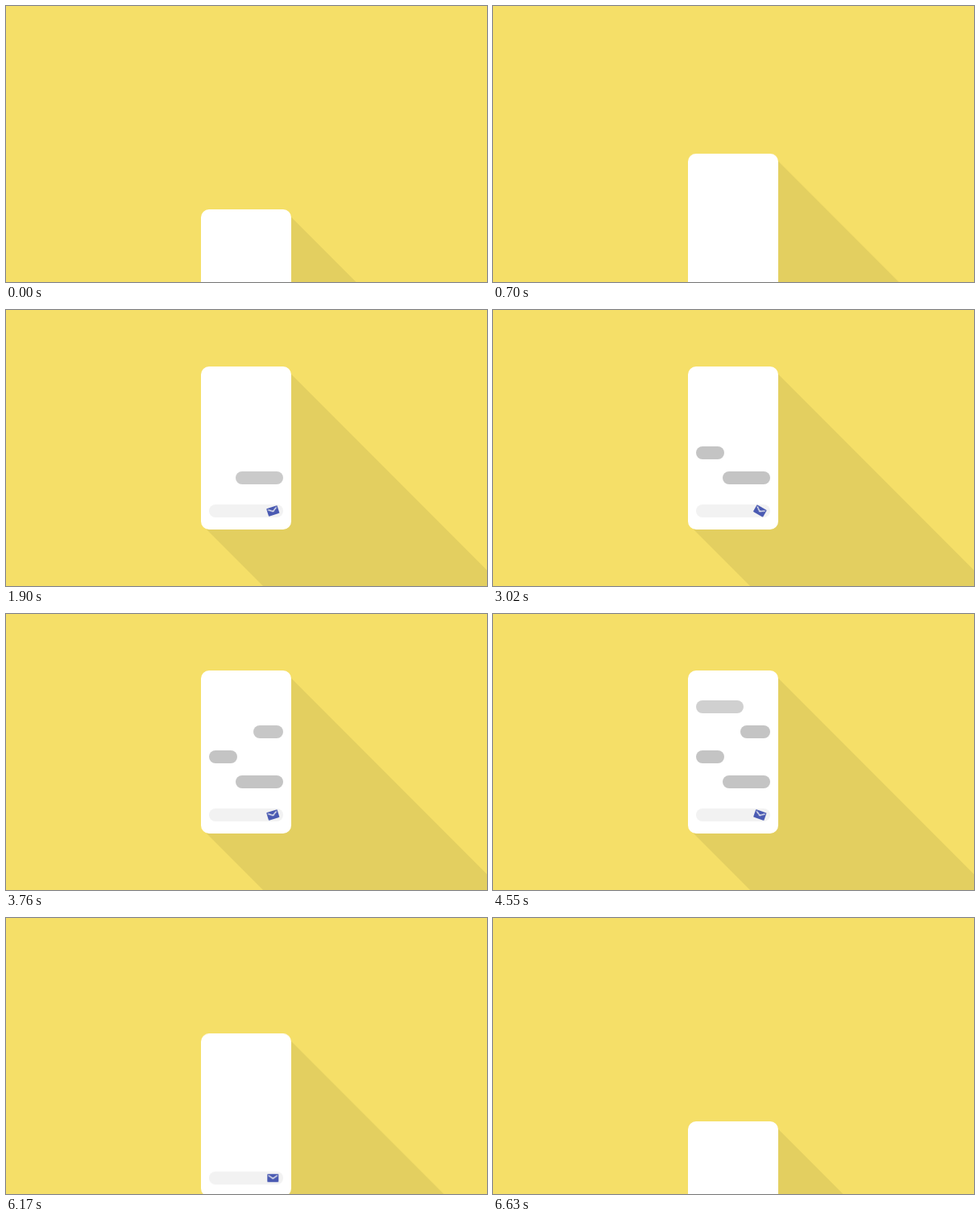
An HTML page that plays this animation: 597x342 px, repeating every 6910 ms.

```html
<!DOCTYPE html>
<html lang="en">
<head>
<meta charset="utf-8">
<title>Chat phone</title>
<style>
  html, body { margin: 0; width: 100%; height: 100%; overflow: hidden; background: #f5df68; }
  svg { display: block; width: 597px; height: 342px; }

  .phone, .icon, .bubble { animation: 6910ms ease-out infinite; }
  .phone { animation-name: rise; }
  .icon { animation-name: wiggle; }
  .bubble { fill: #c4c4c4; opacity: 0; }
  .b1 { animation-name: show1; }
  .b2 { animation-name: show2; }
  .b3 { animation-name: show3; }
  .b4 { animation-name: show4; }

  /* Seven 600 ms moves, one every 910 ms, the first at 550 ms */
  @keyframes rise {
    0%, 7.96% { transform: translate(242px, 252px); }
    16.64%, 86.98% { transform: translate(242px, 70px); }
    95.66%, 100% { transform: translate(242px, 252px); }
  }
  @keyframes wiggle {
    0%, 21.13% { transform: rotate(0deg); }
    29.81%, 34.3% { transform: rotate(-20deg); }
    42.98%, 47.47% { transform: rotate(30deg); }
    56.15%, 60.64% { transform: rotate(-20deg); }
    69.32%, 73.81% { transform: rotate(30deg); }
    82.49%, 100% { transform: rotate(0deg); }
  }
  @keyframes show1 {
    0%, 21.13% { opacity: 0; }
    29.81%, 73.81% { opacity: 1; }
    82.49%, 100% { opacity: 0; }
  }
  @keyframes show2 {
    0%, 34.3% { opacity: 0; }
    42.98%, 73.81% { opacity: 1; }
    82.49%, 100% { opacity: 0; }
  }
  @keyframes show3 {
    0%, 47.47% { opacity: 0; }
    56.15%, 73.81% { opacity: 1; }
    82.49%, 100% { opacity: 0; }
  }
  @keyframes show4 {
    0%, 60.64% { opacity: 0; }
    69.32%, 73.81% { opacity: 1; }
    82.49%, 100% { opacity: 0; }
  }
</style>
</head>
<body>
<svg viewBox="0 0 597 342">
  <g class="phone">
    <path fill="#e3cf60" d="M112 9.5 L512 409.5 L407 602 L7 202 Z"/>
    <rect width="112" height="202" rx="10" fill="#fff"/>

    <rect class="bubble b4" x="10" y="37" width="59" height="16" rx="8"/>
    <rect class="bubble b3" x="65" y="68" width="37" height="16" rx="8"/>
    <rect class="bubble b2" x="10" y="99" width="35" height="16" rx="8"/>
    <rect class="bubble b1" x="43" y="130" width="59" height="16" rx="8"/>

    <rect x="10" y="171" width="92" height="16" rx="8" fill="#f2f2f2"/>
    <g transform="translate(89.3 179)">
      <g class="icon">
        <rect x="-7" y="-5" width="14" height="10" rx="1" fill="#4a5ab2"/>
        <path d="M-5.6 -3.2 L0 .6 L5.6 -3.2" fill="none" stroke="#f2f2f2" stroke-width="1.3"/>
      </g>
    </g>
  </g>
</svg>
</body>
</html>
```
